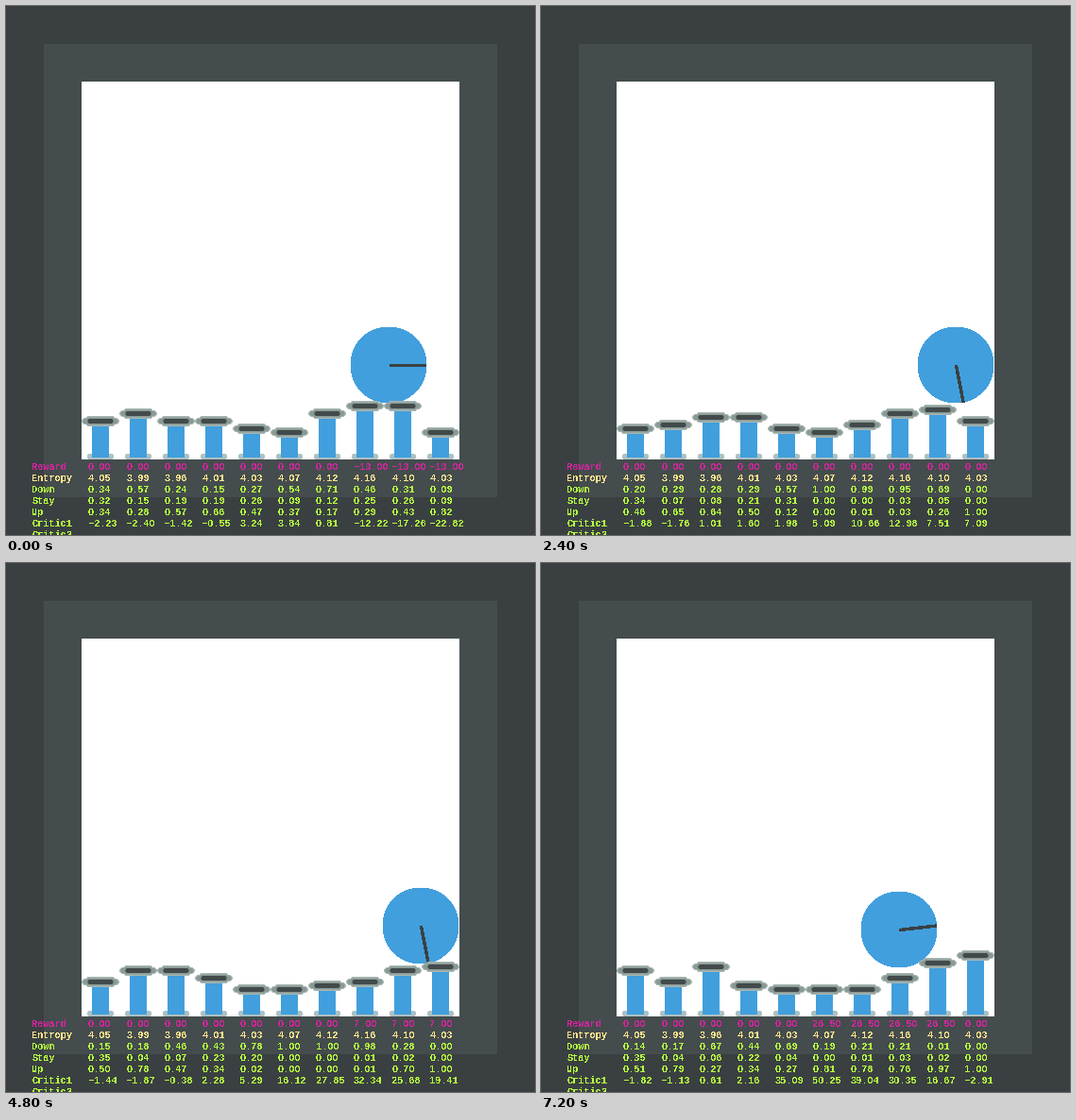
Animation of 560 by 560 pixels, one loop 8000 ms. Source, as a matplotlib script:

```python
import numpy as np
import matplotlib.pyplot as plt
from matplotlib.animation import FuncAnimation
from matplotlib.patches import Circle, Polygon, Rectangle

SIZE, STEPS, STEP_MS = 560, 10, 800
COLS = 10
FLOOR = 480


def rgb(r, g, b):
    return (r / 255, g / 255, b / 255)


OUTER, INNER = rgb(58, 64, 65), rgb(68, 76, 77)
BLUE = rgb(65, 159, 221)
CAP_EDGE, CAP_FILL, CAP_SLOT = rgb(168, 182, 178), rgb(137, 154, 149), rgb(66, 74, 75)
BASE = rgb(172, 193, 196)
PINK, SAND, GREEN = rgb(215, 35, 160), rgb(255, 228, 140), rgb(180, 253, 64)

# Turning points (step, level) of each piston; a level is 4 px
TURNS = [
    [(0, 3), (3.5, 1), (6, 2), (9, 5)],
    [(0, 5), (3, 2), (6, 5), (9, 2)],
    [(0, 3), (1, 4), (2, 3), (5, 6), (6, 5), (8, 7), (9, 6)],
    [(0, 3), (1, 2), (4, 5), (8, 1)],
    [(0, 1), (4, 1), (6, 0)],
    [(0, 0)],
    [(0, 5), (4, 1), (6, 1), (7, 0)],
    [(0, 7), (1, 7), (7, 1), (9, 3)],
    [(0, 7), (1, 6), (2, 7), (5, 4), (7, 6), (8, 6), (9, 7)],
    [(0, 0), (9, 9)],
]

# Ball path: (step, value) points
BALL_X = [(0, 405), (1, 418), (2, 439), (6, 439), (7, 425), (8, 406), (9, 379), (10, 326)]
BALL_Y = [(3, 380), (4, 384), (7, 384), (8, 382), (9, 388)]
BALL_TURN = [(0, 0), (1, 48), (2, 79), (6, 79), (7, 59), (8, 32.5), (9, -6.5)]
REACH = 60

ENTROPY = [4.05, 3.99, 3.96, 4.01, 4.03, 4.07, 4.12, 4.16, 4.10, 4.03]

# Readings at four steps; the others are interpolated
POSES = [0, 2, 6, 9]
DOWN = [
    [.34, .57, .24, .15, .27, .54, .71, .46, .31, .09],
    [.22, .32, .22, .24, .50, 1, .99, .94, .83, 0],
    [.15, .18, .46, .43, .78, 1, 1, .98, .28, 0],
    [.14, .17, .67, .44, .69, .19, .21, .21, .01, 0],
]
UP = [
    [.34, .28, .57, .66, .47, .37, .17, .29, .43, .82],
    [.44, .60, .69, .55, .15, 0, .01, .03, .11, 1],
    [.50, .78, .47, .34, .02, 0, 0, .01, .70, 1],
    [.51, .79, .27, .34, .27, .81, .78, .76, .97, 1],
]
CRITIC = [
    [-2.23, -2.40, -1.42, -.55, 3.24, 3.84, .81, -12.22, -17.26, -22.82],
    [-2.02, -1.72, 1.47, 1.38, .88, 1.41, 4.93, 6.52, 1.45, 2.98],
    [-1.44, -1.87, -.38, 2.28, 5.29, 16.12, 27.85, 32.34, 25.68, 19.41],
    [-1.82, -1.13, .61, 2.16, 35.09, 50.25, 39.04, 30.35, 16.67, -2.91],
]


def along(points, step):
    return np.interp(step, *zip(*points))


def column_x(col):
    return 100 + 40 * col


def reading(table, step):
    return np.array([np.interp(step, POSES, col) for col in zip(*table)])


def stay(step):
    return np.clip(1 - reading(DOWN, step) - reading(UP, step), 0, 1)


def rewards(step):
    """Pistons near the ball's move gain half of a left move, lose a right one."""
    here, there = along(BALL_X, step), along(BALL_X, step + 1)
    left = here - there
    value = left / 2 if left > 0 else left
    return [value if min(abs(column_x(c) - here), abs(column_x(c) - there)) < REACH
            else 0 for c in range(COLS)]


ROWS = [
    ("Reward", PINK, rewards),
    ("Entropy", SAND, lambda step: ENTROPY),
    ("Down", GREEN, lambda step: reading(DOWN, step)),
    ("Stay", GREEN, stay),
    ("Up", GREEN, lambda step: reading(UP, step)),
    ("Critic1", GREEN, lambda step: reading(CRITIC, step)),
]

fig = plt.figure(figsize=(SIZE / 100, SIZE / 100), dpi=100, facecolor=OUTER)
ax = fig.add_axes([0, 0, 1, 1])
ax.set_xlim(0, SIZE)
ax.set_ylim(SIZE, 0)
ax.axis("off")


def rect(x, y, w, h, color, z):
    return ax.add_patch(Rectangle((x, y), w, h, fc=color, lw=0, zorder=z,
                                  antialiased=False))


def shape(points, color, z, smooth=True):
    return ax.add_patch(Polygon(points, fc=color, lw=0, zorder=z,
                                antialiased=smooth))


def label(x, y, text, color):
    return ax.text(x, y, text, color=color, family="Liberation Mono",
                   weight="bold", size=10.2 * 72 / 100, va="baseline", zorder=9,
                   antialiased=False)


def number(value):
    # Letter O stands in for the font's dotted zero
    return f"{value + 0:.2f}".replace("0", "O").replace("-", "\u2212")


def bevel(cx, cy, w, h, cut):
    """Outline of a bar with cut corners."""
    a, b = w / 2, h / 2
    return np.array([(cx - a, cy - b + cut), (cx - a + cut, cy - b),
                     (cx + a - cut, cy - b), (cx + a, cy - b + cut),
                     (cx + a, cy + b - cut), (cx + a - cut, cy + b),
                     (cx - a + cut, cy + b), (cx - a, cy + b - cut)])


# Bars that make up a piston head: width, height, cut, colour
HEAD = [(40, 7, 2.5, CAP_EDGE), (30, 11, 1.5, CAP_EDGE),
        (37, 5, 1.5, CAP_FILL), (29, 8, 1, CAP_FILL), (27, 5, 1.5, CAP_SLOT)]


class Piston:
    def __init__(self, col):
        self.x = column_x(col)
        self.turns = TURNS[col]
        shape(bevel(self.x, FLOOR - 3, 28, 6, 1.5), BASE, 2)
        self.shaft = rect(self.x - 9, 450, 18, 25, BLUE, 3)
        self.parts = [shape([(0, 0)] * 3, c, 6) for *_, c in HEAD]

    def move(self, step):
        y = 451.5 - 4 * round(along(self.turns, step))
        self.shaft.set_y(y)
        self.shaft.set_height(FLOOR - 2 - y)
        for part, (w, h, cut, _) in zip(self.parts, HEAD):
            part.set_xy(bevel(self.x, y, w, h, cut))


def spoke(x, y, degrees, length=39.5, half=1.2):
    """Line whose ends are cut along the minor axis."""
    t = np.radians(degrees)
    start = np.array([x + .5, y + .5])
    end = start + length * np.array([np.cos(t), np.sin(t)])
    flat = abs(np.cos(t)) > abs(np.sin(t))
    side = np.array([0, half]) if flat else np.array([half, 0])
    return [start - side, end - side, end + side, start + side]


rect(40, 40, 480, 480, INNER, 0)
rect(80, 80, 400, 400, "white", 1)
pistons = [Piston(c) for c in range(COLS)]
ball = ax.add_patch(Circle((0, 0), 40, fc=BLUE, lw=0, zorder=4, antialiased=False))
line = shape([(0, 0)] * 4, OUTER, 5, smooth=False)

cells = []
for r, (name, color, _) in enumerate(ROWS):
    y = 491 + 12 * r
    label(27.5, y, name, color)
    cells.append([label(87 + 40.15 * c, y, "", color) for c in range(COLS)])
label(27.5, 563, "Critic2", GREEN)


def draw(step):
    for piston in pistons:
        piston.move(step)
    x, y = along(BALL_X, step), along(BALL_Y, step)
    ball.center = (x, y)
    line.set_xy(spoke(x, y, along(BALL_TURN, step)))
    for row, (_, _, values) in zip(cells, ROWS):
        for cell, value in zip(row, values(step)):
            cell.set_text(number(value))
    return []


anim = FuncAnimation(fig, draw, frames=STEPS, interval=STEP_MS,
                     repeat=True, repeat_delay=0, blit=False)
plt.show()
```
